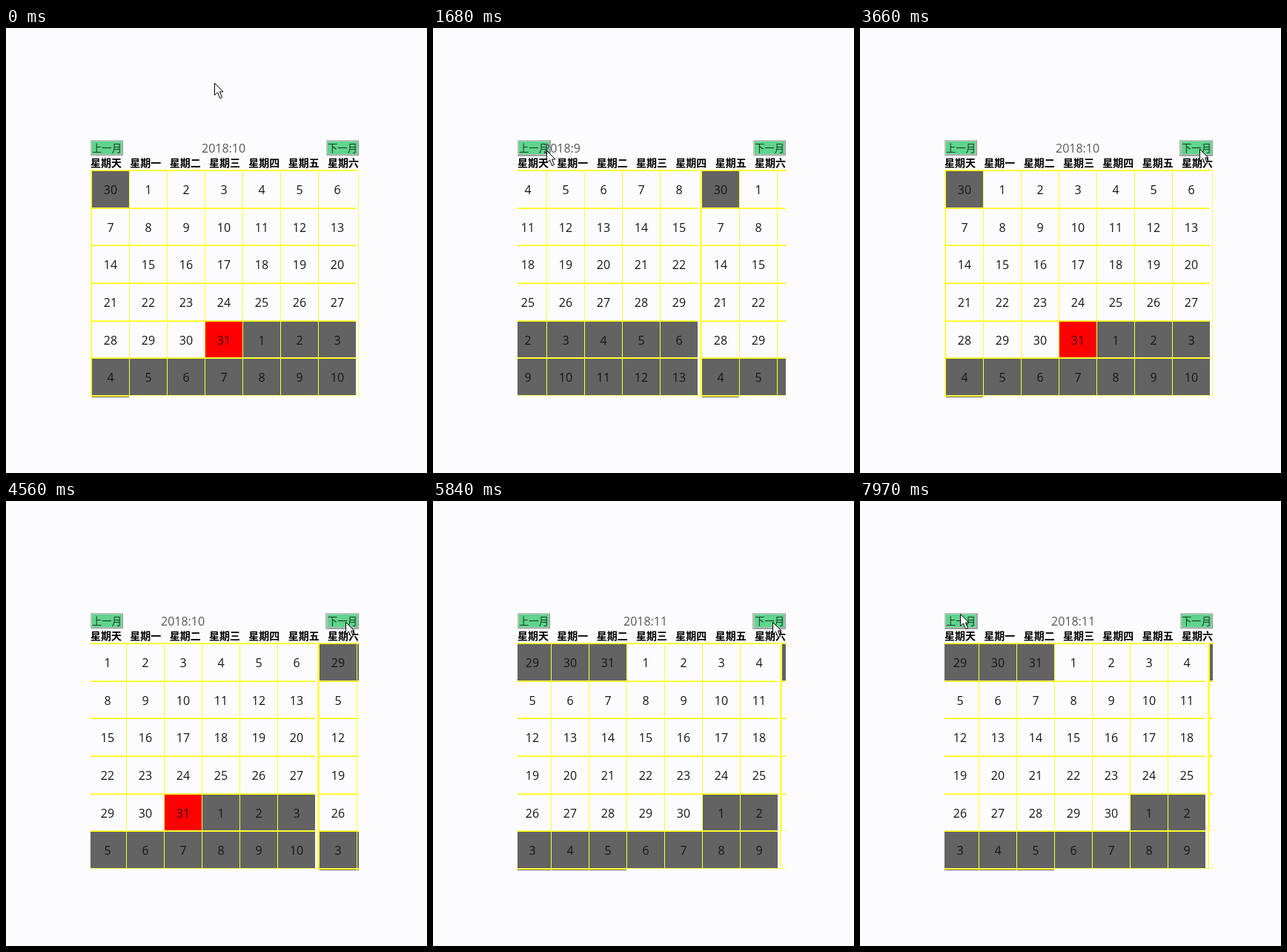
An HTML page with a canvas for the animation above (8000 ms loop, 568 by 600 pixels).

```html
<!DOCTYPE html>
<html lang="zh-CN">
<head>
<meta charset="utf-8">
<style>
  html, body { margin: 0; width: 100%; height: 100%; overflow: hidden; background: #fcfcfe; }
  canvas { display: block; }
</style>
</head>
<body>
<canvas id="stage" width="568" height="600"></canvas>
<script>
const ctx = document.getElementById('stage').getContext('2d');
const LOOP = 8000, SLIDE = 600, PANEL = 362;
const LEFT = 114, TOP = 191, CELL_W = 51, CELL_H = 152 / 3;
const YELLOW = '#ffff00', PALE_YELLOW = '#ffff60', DIM = '#636363', PAGE = '#fcfcfe';
const LATIN = '"Open Sans", "Noto Sans", sans-serif';
const CJK = '"Noto Sans CJK SC", "Noto Sans CJK", sans-serif';

// first: day number of the top-left cell; zero and below belong to the month before
const months = [
  { title: '2018:9', first: 2, days: 30, before: 31, cells: 42 },
  { title: '2018:10', first: 0, days: 31, before: 30, cells: 43, today: 31 },
  { title: '2018:11', first: -2, days: 30, before: 31, cells: 45 },
  { title: '2018:12', first: -1, days: 31, before: 30, cells: 33 }
];
// [start time, direction]
const slides = [[1310, -1], [3027, 1], [4408, 1], [5787, 1], [7419, -1]];
// [time, x, y]
const pointerPath = [
  [0, 281, 74], [760, 153, 165], [2060, 153, 165], [2860, 458, 163],
  [6020, 458, 163], [6480, 105, 158], [6740, 135, 152], [8000, 135, 152]
];

const clamp = v => Math.min(1, Math.max(0, v));
const swing = v => 0.5 - Math.cos(Math.PI * clamp(v)) / 2;

function box(x, y, w, h, color) {
  ctx.fillStyle = color;
  ctx.fillRect(x, y, w, h);
}

function label(text, x, y, font, color, align = 'left') {
  ctx.font = font;
  ctx.fillStyle = color;
  ctx.textAlign = align;
  ctx.fillText(text, x, y);
}

function drawCell(month, index) {
  const col = index % 7, row = Math.floor(index / 7);
  const x = LEFT + 1 + col * CELL_W;
  const y = Math.round(TOP + 1 + row * CELL_H);
  const bottom = Math.round(TOP + 1 + (row + 1) * CELL_H);
  let day = month.first + index;
  const outside = day < 1 || day > month.days;
  const today = day === month.today;
  if (day < 1) day += month.before;
  else if (day > month.days) day -= month.days;

  box(x, y, CELL_W, bottom - y, today ? '#ff0000' : outside ? DIM : PAGE);
  box(x, bottom - 1, CELL_W, 1, PALE_YELLOW);
  box(x, y, CELL_W, 1, YELLOW);
  box(x, y, 1, bottom - y, '#ffff30');
  label(day, x + 26, y + 32, '16px ' + LATIN, today ? '#400000' : '#161616', 'center');
}

function drawPanel(month, offset) {
  ctx.save();
  ctx.beginPath();
  ctx.rect(LEFT, 140, PANEL, 358);
  ctx.clip();
  ctx.translate(offset, 0);
  ctx.strokeStyle = PALE_YELLOW;
  ctx.lineWidth = 1;
  ctx.strokeRect(LEFT + 0.5, TOP + 0.5, PANEL - 1, 304);
  for (let i = 0; i < month.cells; i++) drawCell(month, i);
  label(month.title, 264, 168, '16px ' + LATIN, '#555');
  ctx.restore();
}

function drawButton(text, x, focused, grow) {
  if (focused) box(x + Math.min(grow, 0), 151, 45, 22, '#a8b4b4');
  box(x, 151, 44, 21, '#b8c4bc');
  box(x + 1, 171, 43, 1, '#8c9890');
  box(x + 43, 152, 1, 20, '#8c9890');
  box(x + 2, 153, 40, 17, '#5fd48c');
  label(text, x + 22, 167, '13.33px ' + CJK, '#1c3828', 'center');
}

function drawPointer(time) {
  const i = pointerPath.findIndex((p, n) => n && time <= p[0]);
  const [t0, x0, y0] = pointerPath[i - 1], [t1, x1, y1] = pointerPath[i];
  const k = swing((time - t0) / (t1 - t0));
  ctx.save();
  ctx.translate(Math.round(x0 + (x1 - x0) * k) + 0.5, Math.round(y0 + (y1 - y0) * k) + 0.5);
  const arrow = new Path2D('M0 0V16L4 12.5L7 20L10 19L7 11.5H11.5Z');
  ctx.fillStyle = '#fff';
  ctx.fill(arrow);
  ctx.strokeStyle = '#000';
  ctx.lineWidth = 1;
  ctx.stroke(arrow);
  ctx.restore();
}

function draw(time) {
  box(0, 0, 568, 600, PAGE);

  const nextFocused = time >= 2960 && time < 7380;
  drawButton('上一月', 114, time >= 1240 && !nextFocused, 1);
  drawButton('下一月', 432, nextFocused, -1);
  [...'天一二三四五六'].forEach((name, i) =>
    label('星期' + name, LEFT + i * 53.33, 187, 'bold 14px ' + CJK, '#000'));

  const position = slides.reduce((p, [start, dir]) => p + dir * swing((time - start) / SLIDE), 1);
  months.forEach((month, i) => {
    const offset = Math.round((i - position) * PANEL);
    if (Math.abs(offset) < PANEL) drawPanel(month, offset);
  });
  drawPointer(time);
}

const began = performance.now();
function tick() {
  draw((performance.now() - began) % LOOP);
  requestAnimationFrame(tick);
}
tick();
</script>
</body>
</html>
```
